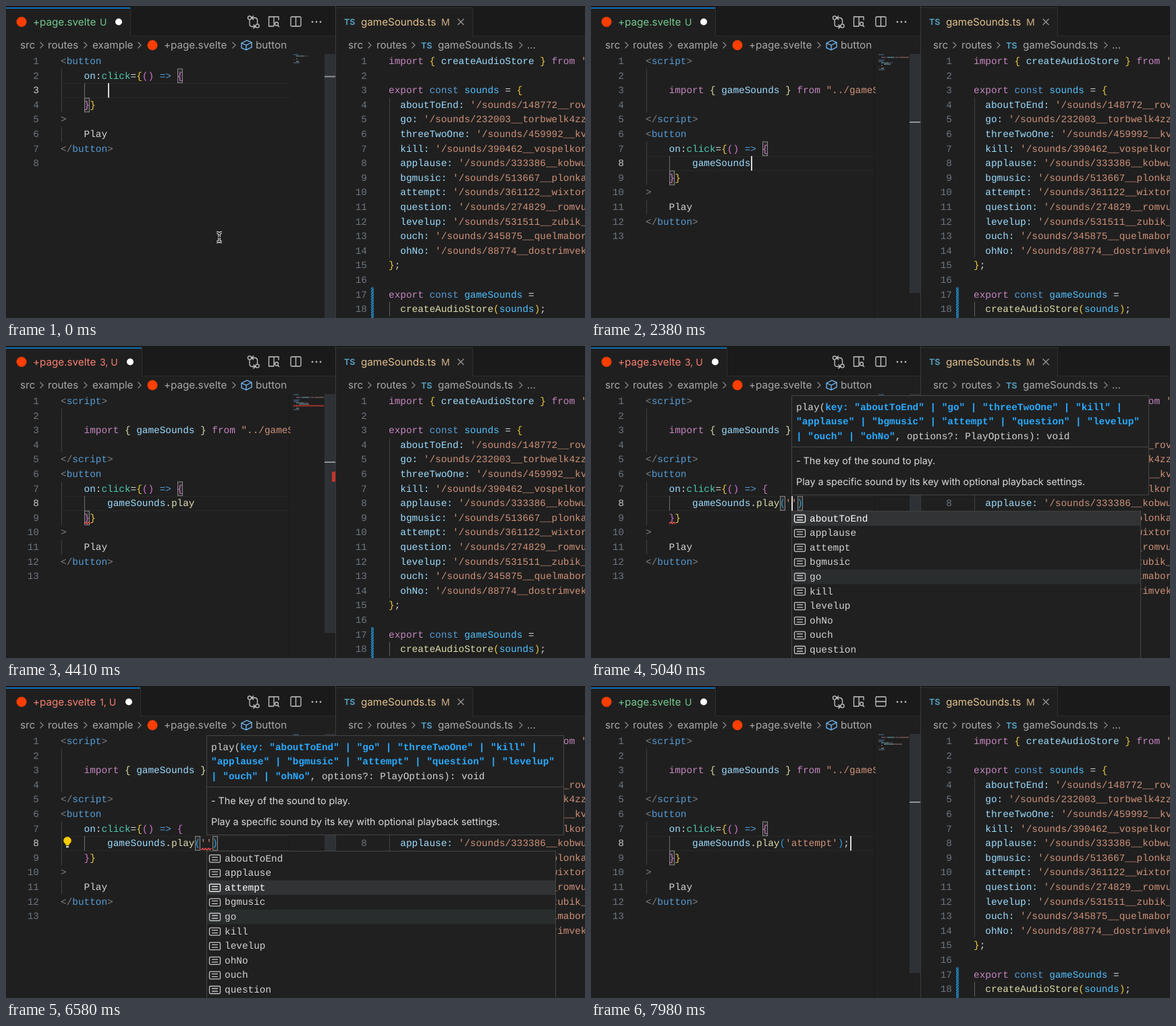
Recreate the animation shown at these times as an HTML page. Size 858 px wide and 462 px high, loop 8000 ms.

```html
<!DOCTYPE html>
<html lang="en">
<head>
<meta charset="utf-8">
<title>Editor typing</title>
<style>
  html, body { margin: 0; width: 100%; height: 100%; overflow: hidden; background: #1f1f1f; }
  svg { display: block; width: 858px; height: 462px; }
  text { white-space: pre; text-rendering: geometricPrecision; }
  .mono { font: 14.38px "Liberation Mono", monospace; }
  .small { font-size: 12.25px; }
  .ui { font: 15.2px Inter, sans-serif; }
  .doc { font-size: 14.3px; }
  .line { fill: none; stroke: #c5c5c5; stroke-width: 1.3; }
  .bright .line { stroke: #ffffff; }
</style>
</head>
<body>
<svg id="stage" viewBox="0 0 858 462"></svg>
<script>
const LOOP = 8000, CHAR = 8.63, ROW = 21.6, TOP = 71, LEFT = 81, RIGHT = 567;
const ink = {
  g: '#808080', b: '#569cd6', w: '#d4d4d4', v: '#9cdcfe', t: '#4ec9b0', y: '#ecc93a', p: '#cf74ca',
  n: '#2f9be0', k: '#c586c0', s: '#ce9178', f: '#dcdcaa', c: '#4fc1ff', H: '#2aaaff', d: '#a8a8a8', W: '#ffffff'
};

// Code is written as segments split by ¦, each led by its ink letter.
const parse = src => src ? src.split('¦').map(s => [s[0], s.slice(1)]) : [];
const esc = s => s.replace(/&/g, '&amp;').replace(/</g, '&lt;');
const rowTop = n => TOP + ROW * (n - 1);

const rect = (x, y, w, h, fill, extra = '') =>
  `<rect x="${x}" y="${y}" width="${w}" height="${h}" fill="${fill}" ${extra}/>`;
const frame = (x, y, w, h, fill, stroke) =>
  rect(x + .5, y + .5, w - 1, h - 1, fill, `stroke="${stroke}"`);
const path = (d, extra = '') => `<path class="line" d="${d}" ${extra}/>`;
const dot = (x, y, r, fill) => `<circle cx="${x}" cy="${y}" r="${r}" fill="${fill}"/>`;
const text = (x, y, s, fill, cls = 'ui', extra = '') =>
  `<text x="${x}" y="${y}" class="${cls}" fill="${fill}" ${extra}>${esc(s)}</text>`;
const code = (x, y, src) => `<text x="${x}" y="${y}" class="mono">` + parse(src).map(([k, s]) =>
  `<tspan fill="${ink[k]}"${k === 'H' ? ' font-weight="700"' : ''}>${esc(s)}</tspan>`).join('') + '</text>';
const number = (x, n, on) =>
  text(x, rowTop(n) + 15, String(n), on ? '#cccccc' : '#6e7681', 'mono', 'text-anchor="end"');
const guide = (x, from, to, color = '#404040') =>
  rect(x, rowTop(from), 1, ROW * (to - from + 1), color);
const squiggle = (x, y, w) => {
  let d = `M${x} ${y}`;
  for (let i = 1; i * 2.2 <= w; i++) d += `L${x + i * 2.2} ${y + (i % 2 ? -2.4 : 0)}`;
  return path(d, 'style="stroke:#f14c4c;stroke-width:1.4"');
};

const sounds = [
  ['aboutToEnd', '148772__rov'], ['go', '232003__torbwelk4zz'], ['threeTwoOne', '459992__kv'],
  ['kill', '390462__vospelkor'], ['applause', '333386__kobwu'], ['bgmusic', '513667__plonka'],
  ['attempt', '361122__wixtor'], ['question', '274829__romvu'], ['levelup', '531511__zubik_'],
  ['ouch', '345875__quelmabor'], ['ohNo', '88774__dostrimvek']
];
const store = [
  "kimport ¦y{ ¦vcreateAudioStore ¦y} ¦kfrom ¦s'", '',
  'kexport ¦bconst ¦csounds ¦w= ¦y{',
  ...sounds.map(([k, v]) => `v  ${k}: ¦s'/sounds/${v}`),
  'y}¦w;', '',
  'kexport ¦bconst ¦cgameSounds ¦w=',
  'f  createAudioStore¦y(¦csounds¦y)¦w;'
];
const imports = ['g<¦bscript¦g>', '', 'k    import ¦f{ ¦vgameSounds ¦f} ¦kfrom ¦s"../gameSounds.js"', '', 'g</¦bscript¦g>'];
const button = line => ['g<¦bbutton', 'v    on¦w:¦tclick¦w=¦y{¦p() ¦b=> ¦p{', line, 'p    }¦y}',
  'g>', 'w    Play', 'g</¦bbutton¦g>', ''];

const variable = (label, detail) => ['var', label, detail];
const pads = ['', 'Button', 'Event', 'HapticActuator'];
const menus = {
  gam: [
    ['snip', 'wa-¦Hg¦wuard-can-¦Hma¦wtch', 'Angular CanMatch Guard'],
    ['const', 'Hgam¦weSounds', '../gameSounds.js'],
    ...pads.map(p => variable('HGam¦wepad' + p)),
    variable('wWeb¦HG¦wLS¦Ham¦wpler'), variable('wWeb¦HG¦wLFr¦Ham¦webuffer'),
    variable('wWeb¦HG¦wLProgr¦Ham'),
    ['const', 'wVSCODE_¦HG¦wIT_¦HA¦wSKPASS_¦HM¦wAIN', '$env/static/private'],
    variable('wWeb¦HG¦wLTr¦Ha¦wnsfor¦Hm¦wFeedback'),
    variable('wWeb¦HG¦wLUnifor¦Hm¦wLoc¦Ha¦wtion')
  ],
  game: [['const', 'Hgame¦wSounds', '../gameSounds.js'], ...pads.map(p => variable('HGame¦wpad' + p))],
  gameS: [['const', 'HgameS¦wounds', '../gameSounds.js']],
  keys: sounds.map(s => s[0]).sort((a, b) => a.localeCompare(b)).map(k => ['const', 'w' + k])
};

const icons = {
  snip: (x, y) => path(`M${x + 1.5} ${y - 7}h14v14h-14z`, 'stroke-dasharray="1.6 1.2"') + path(`M${x + 1} ${y + 7}h15`),
  const: (x, y) => path(`M${x + 2} ${y - 5.5}h13q1.5 0 1.5 1.5v8q0 1.5-1.5 1.5h-13q-1.5 0-1.5-1.5v-8q0-1.5 1.5-1.5zM${x + 4} ${y - 2}h9M${x + 4} ${y + 2}h9`),
  var: (x, y) => path(`M${x + 4} ${y - 5}h-3v10h3M${x + 13} ${y - 5}h3v10h-3M${x + 5} ${y}l4-3 4 1v2l-4 3-4-1zM${x + 5} ${y}l4 1 4-3`, 'style="stroke:#75beff"')
};
const chevron = x => path(`M${x - 2.5} 53.5l4.5 4.5-4.5 4.5`, 'style="stroke:#8c8c8c;stroke-width:1.2"');

function menu(x, y, w, h, rows, sel, hover) {
  let out = frame(x, y, w, h, '#202020', '#454545');
  rows.forEach(([icon, label, detail], i) => {
    const top = y + .6 + ROW * i, on = i === sel;
    if (on || i === hover) out += rect(x + 1, top, w - 2, ROW, on ? '#323334' : '#2a2d2e');
    out += `<g class="${on ? 'bright' : ''}">` + icons[icon](x + 4, top + 11) + '</g>' +
      code(x + 27, top + 15, on ? label.replace(/(^|¦)w/g, '$1W') : label);
    if (detail) out += text(x + 505, top + 15, detail, on ? '#c8c8c8' : '#9d9d9d', 'mono small', 'text-anchor="end"');
  });
  return out;
}

function guardDoc() {
  const lines = [
    [152, 'dAngular CanMatch guard'], [174, 'd(Version 16))'],
    [214, 'kimport ¦y{ ¦winject ¦y} ¦kfrom'], [236, 'kimport ¦n{ ¦wCanMatchFn'],
    [279, 'wexport const NameGuard'], [301, 'w    route: Route,'], [322, 'w    segments: UrlSegment'],
    [344, 'w) => ¦n{'], [366, 'k    return ¦btrue¦w;'], [388, 'n}']
  ];
  return frame(693, 136, 180, 268, '#202020', '#454545') + lines.map(([y, s]) => code(700, y + 5, s)).join('');
}

function signature(x) {
  const t = x + 7;
  return frame(x, 73, 530, 148, '#202020', '#454545') +
    code(t, 94.5, 'wplay(¦Hkey: "aboutToEnd" | "go" | "threeTwoOne" | "kill" |') +
    code(t, 116, 'H"applause" | "bgmusic" | "attempt" | "question" | "levelup"') +
    code(t, 137.5, 'H| "ouch" | "ohNo"¦w, options?: PlayOptions): void') +
    rect(x + 1, 149, 528, 1, '#454545') +
    text(t, 175, '- The key of the sound to play.', '#dcdcdc', 'ui doc') +
    text(t, 206, 'Play a specific sound by its key with optional playback settings.', '#dcdcdc', 'ui doc');
}

function header(s) {
  const bad = s.errors > 0, end = bad ? (s.errors === 3 ? 201 : 199) : 184;
  const color = bad ? '#f88070' : '#73c991';
  let out = rect(0, 0, 858, 45, '#1a1a1a') + rect(0, 44, 858, 1, '#2b2b2b') +
    rect(0, 2, end, 43, '#1f1f1f') + rect(0, 2, end, 2, '#0e70b5') + rect(end, 2, 1, 43, '#2f2f2f') +
    rect(489, 2, 202, 43, '#1f1f1f') + rect(489, 2, 202, 1, '#303030') + rect(691, 2, 1, 43, '#2f2f2f');
  out += dot(23, 23.5, 7.5, '#ff3e00') + text(40, 29, '+page.svelte', color) +
    text(139, 28.5, bad ? s.errors + ', U' : 'U', color, 'ui', 'style="font-size:14px"') +
    dot(end - 17, 23.5, 5, '#ffffff');
  out += path('M361 20.5v6q0 4 4 4h4M366.5 27.5l3 3-3 3M372.5 26.5v-5q0-4-4-4h-4M367 14.5l-3 3 3 3') +
    '<g class="line"><circle cx="361" cy="17.5" r="2.6"/><circle cx="372.5" cy="29.5" r="2.6"/></g>' +
    path('M397 30h-7.500v-14h14.500v5M397 16v14M402.500 28.500l2.500 2.500') + '<circle class="line" cx="401" cy="26.5" r="2.5"/>' +
    path('M423.5 16h12q1.5 0 1.5 1.5v11q0 1.5-1.5 1.5h-12q-1.5 0-1.5-1.5v-11q0-1.5 1.5-1.5z' + (s.flat ? 'M422 23h15' : 'M429.5 16v14')) +
    [454, 460, 466].map(x => dot(x, 23.5, 1.3, '#c5c5c5')).join('');
  const badge = (x, y) => text(x, y, 'TS', '#519aba', 'ui', 'style="font-size:12.5px;font-weight:700"');
  out += badge(501, 28) + text(526, 29, 'gameSounds.ts', '#e2c08d') +
    text(645, 28.5, 'M', '#e2c08d', 'ui', 'style="font-size:14px" opacity=".9"') +
    path('M669.5 19l9 9M678.5 19l-9 9', 'style="stroke:#9a9a9a;stroke-width:1.2"');
  const crumbs = [[21, 'src'], [62, 'routes'], [128, 'example'], [234, '+page.svelte'], [370, 'button'],
    [507, 'src'], [549, 'routes'], [640, 'gameSounds.ts'], [772, '…']];
  out += crumbs.map(([x, s]) => text(x, 63, s, '#a9a9a9')).join('') +
    [53, 118, 198, 338, 539, 604, 763].map(chevron).join('') + dot(217, 58, 7.5, '#ff3e00') + badge(615, 62.5) +
    path('M349 55l8-4 7 3v7l-8 4-7-3zM349 55l7 3 8-4M356 58v7', 'style="stroke:#75beff"');
  return out;
}

function rightPane() {
  return store.map((src, i) => number(535, i + 1) + code(RIGHT, rowTop(i + 1) + 15, src)).join('') +
    guide(568, 4, 14) + guide(568, 18, 18, '#606060') +
    rect(541, rowTop(17), 4, 46, 'url(#hatch)');
}

function minimap(doc, s, base) {
  let out = '';
  doc.forEach((src, i) => {
    let x = 426;
    for (const [k, str] of parse(src)) {
      const pad = str.length - str.trimStart().length, w = Math.min(str.trim().length, 471 - x - pad);
      if (w > 0) out += rect(x + pad, 71.5 + 2 * i, w, 1.2, ink[k], 'opacity=".6"');
      x += str.length;
    }
  });
  if (s.mark) out += rect(426, 71.5 + 2 * (base + 3), 45, 2, '#c0392b', 'opacity=".8"');
  return out;
}

function leftPane(s) {
  const base = s.imported ? 5 : 0, now = base + 3, top = rowTop(now);
  const doc = [...(base ? imports : []), ...button(s.line && 'w        ¦' + s.line)];
  const len = parse(s.line).reduce((n, t) => n + t[1].length, 0);
  const at = col => LEFT + CHAR * col;
  const mark = (col, n) => frame(Math.round(at(col) + .5), rowTop(n), 8, ROW, '#2a2d2a', '#888888');
  let out = rect(82, top, 340, 1, '#2a2a2a') + rect(82, top + 21, 340, 1, '#2a2a2a');
  if (base) out += guide(82, 2, 4) + rect(419, TOP, 2, 391, '#1b1b1b');
  out += guide(82, base + 2, base + 4) + guide(82, base + 6, base + 6) + guide(116, now, now, '#707070');
  out += s.match === 'paren'
    ? mark(15 + 8, now) + mark(8 + s.close, now)
    : mark(20, base + 2) + mark(4, base + 4);
  out += '<g clip-path="url(#code)">' + doc.map((src, i) => code(LEFT, rowTop(i + 1) + 15, src)).join('') + '</g>';
  out += doc.map((_, i) => number(49, i + 1, i + 1 === now)).join('');
  if (s.wave === 'brace') out += squiggle(116, rowTop(now + 1) + 19.5, 9);
  if (s.wave === 'quote') out += squiggle(289, top + 20.5, 17);
  if (s.caret) out += rect(Math.round(at(8 + len - (s.back || 0)) + .7), top, 2, ROW, '#d8d8d8');
  if (s.bulb) out += dot(91, 229, 5.8, '#ffcc00') + rect(88.5, 233, 5, 3, '#ffcc00') + rect(89, 237, 4, 2.2, '#e0e0e0');
  out += minimap(doc, s, base) + rect(472, TOP, 16, base ? 354 : 391, '#2e3135') +
    rect(472, base ? 171 : 103.5, 16, 2, '#8f9296');
  if (s.mark) out += rect(483, 186, 5, 15, '#c8322b');
  return out;
}

const beam = (color, width) => path('M312 335.500q4 0 4 2.500q0-2.500 4-2.500M316 338v9M312 349.500q4 0 4-2.500q0 2.500 4 2.500M314 342.500h4',
  `style="stroke:${color};stroke-width:${width}"`);
const pointer = beam('#ffffff', 3.4) + beam('#111111', 1.3);
const defs = `<defs><clipPath id="code"><rect x="0" y="70" width="421.500" height="392"/></clipPath>
  <pattern id="hatch" width="4" height="4" patternUnits="userSpaceOnUse"><rect width="4" height="4" fill="#1b4a66"/>
  <path d="M-1 5L5-1M-1 1L1-1M3 5L5 3" stroke="#2490cc" stroke-width="1.5"/></pattern></defs>`;

function draw(s) {
  let out = defs + rect(0, 0, 858, 462, '#1f1f1f') + header(s) + leftPane(s) + rightPane() + rect(488, 0, 1, 462, '#3a3a3a');
  if (s.mouse) out += pointer;
  if (s.sig) out += signature(s.sig);
  if (s.menu === 'keys') out += menu(297, 244, 518, 240, menus.keys, s.sel, 4);
  else if (s.menu) {
    const rows = menus[s.menu];
    out += menu(176, 136, 518, rows.length * ROW + 4.8, rows, 0, 9);
    if (s.menu === 'gam') out += guardDoc();
  }
  return out;
}

const call = (inner, tail = '') => `vgameSounds¦w.¦fplay¦n(¦s${inner}¦n)` + (tail && '¦w' + tail);
// Each cue patches the state from its time on.
const cues = [
  [0, { line: '', caret: 1, mouse: 1, match: 'brace', errors: 0 }],
  [350, { caret: 0 }],
  [910, { caret: 1 }],
  [1260, { line: 'vg', mouse: 0 }],
  [1330, { line: 'vga' }],
  [1540, { line: 'vgam', menu: 'gam' }],
  [1750, { line: 'vgame', menu: 'game' }],
  [1890, { line: 'vgameS', menu: 'gameS' }],
  [2380, { line: 'vgameSounds', menu: '', imported: 1 }],
  [2870, { line: 'vgameSounds¦w.' }],
  [3430, { caret: 0 }],
  [3710, { mark: 1 }],
  [3850, { errors: 3, wave: 'brace' }],
  [3920, { caret: 1 }],
  [4410, { line: 'vgameSounds¦w.¦fplay', caret: 0 }],
  [4550, { caret: 1 }],
  [4970, { line: call(''), back: 1, match: 'paren', close: 16, sig: 288 }],
  [5040, { line: call("''"), back: 2, close: 18, sig: 297, menu: 'keys', sel: 0 }],
  [5460, { caret: 0 }],
  [5740, { errors: 1, wave: 'quote', mark: 0 }],
  [5880, { sel: 1 }],
  [6020, { caret: 1 }],
  [6090, { bulb: 1 }],
  [6230, { sel: 2 }],
  [6510, { caret: 0 }],
  [6720, { line: call("'attempt'"), close: 25, menu: '', wave: '', caret: 1 }],
  [6790, { sig: 357 }],
  [7000, { bulb: 0 }],
  [7210, { back: 1, sig: 366 }],
  [7350, { back: 0, sig: 0 }],
  [7490, { line: call("'attempt'", ';'), match: 'brace' }],
  [7630, { errors: 0 }],
  [7980, { flat: 1 }]
];

const stage = document.getElementById('stage');
let shown = 0;
function tick() {
  const t = performance.now() % LOOP;
  const count = cues.filter(c => c[0] <= t).length;
  if (count !== shown) {
    shown = count;
    stage.innerHTML = draw(Object.assign({}, ...cues.slice(0, count).map(c => c[1])));
  }
  requestAnimationFrame(tick);
}
tick();
</script>
</body>
</html>
```
